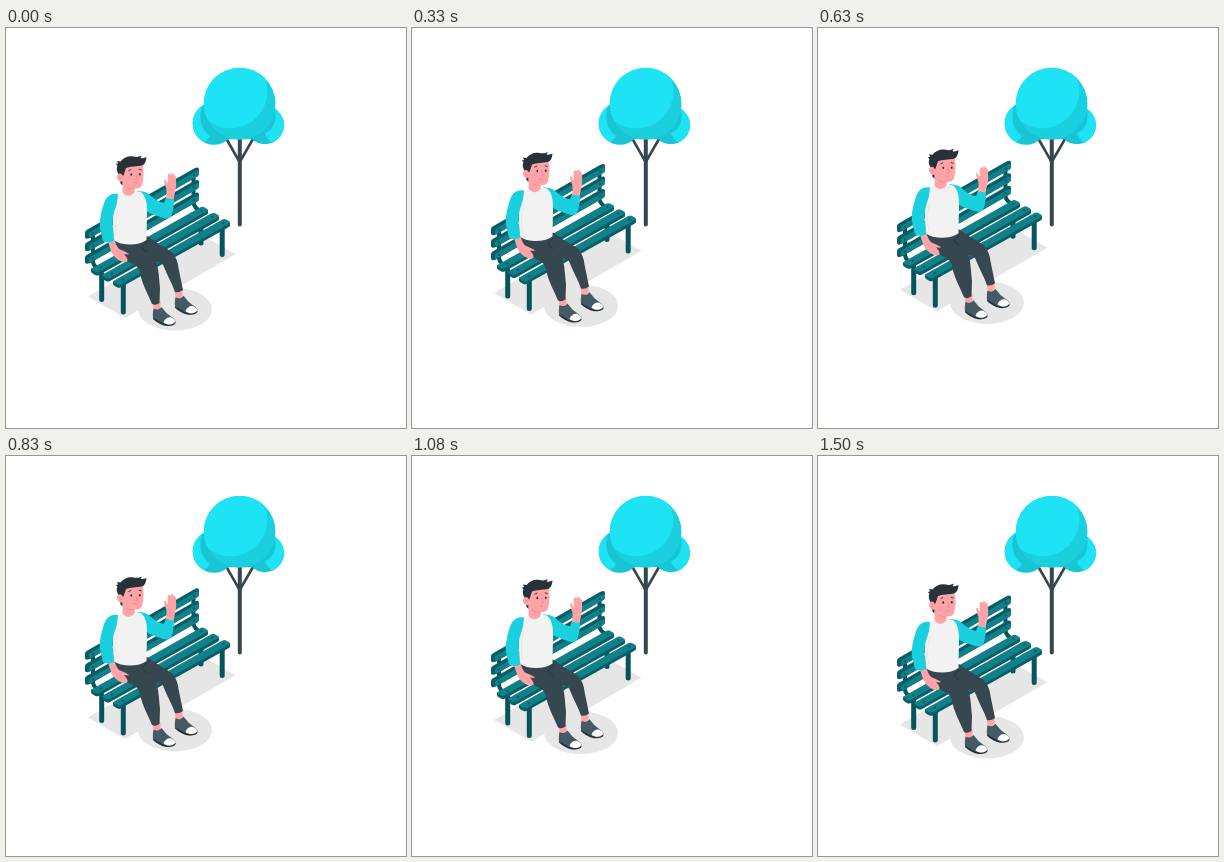
An HTML page for the animation above (1540 ms loop, 400 by 400 pixels).

```html
<!DOCTYPE html>
<html lang="en">
<head>
<meta charset="utf-8">
<title>Park bench</title>
<style>
  html, body { margin: 0; width: 100%; height: 100%; overflow: hidden; background: #fff; }
  svg { display: block; width: 100vw; height: 100vh; }
  .dark { fill: #075e66; }
  .teal { fill: #128089; }
  .hair { fill: #263238; }
  .cloth { fill: #37474f; }
  .skin { fill: #ffa3a6; }
  .cyan { fill: #1ad0df; }
  .deep { fill: #19c5d4; }
  .light { fill: #1de3f5; }
  .shade { fill: #e6e6e6; }
  .line { fill: none; stroke-linecap: round; stroke-linejoin: round; }
</style>
</head>
<body>
<svg viewBox="0 0 400 400">
  <defs>
    <clipPath id="crown"><circle cx="233.7" cy="75.8" r="36"/></clipPath>
    <clipPath id="bushes"><circle cx="208" cy="95.5" r="21.3"/><circle cx="258.8" cy="97" r="19.2"/></clipPath>
    <g id="backSlat">
      <path class="dark" d="M79 204.500q0-1.500 2-2.700L188 140.500q5-2.500 5 1v4q0 2-2 3L84 210q-5 2-5-1z"/>
      <path class="teal" d="M83 206q0-1.500 2-2.500L190 143.200q3-1.500 3 .500v2q0 2-2 3L86 208.700q-3 1.500-3-1z"/>
      <circle class="dark" cx="87" cy="205.500" r="1.200"/>
      <circle class="dark" cx="188" cy="147" r="1.300"/>
    </g>
    <g id="seatSlat">
      <path class="dark" d="M107 253.500L219 192l5 3v2.500q0 1-2 2L115 259.300q-2 1-4 0l-3-1.800q-1-1-1-2z"/>
      <path class="teal" d="M108 252.700L216 191.800q2.500-1.200 4-.300l3.200 1.800q1.600 1.200-.700 2.600L115 256.200q-2 1-4 0l-3-1.700q-1.400-1 0-1.800z"/>
      <circle class="dark" cx="117" cy="251.800" r="1.200"/>
      <circle class="dark" cx="217.300" cy="195" r="1.200"/>
    </g>
    <g id="shoe">
      <path class="hair" d="M147 287v4c3 3 8 6 13 7 5 .500 10-1 9.500-4z"/>
      <path fill="#455a64" d="M147.500 280.500c3 2 6 1 8-1.500l5 6c3 3 8 5 9 8-1 4-7 5-11 3-4-1.500-8-5-11.500-6-.500-4 0-7 .500-9.500z"/>
      <path fill="#fff" d="M157.500 294.500c1-4 5-6 8-5 3 1.500 4 3 3.500 4.500-2 3-7 3.500-11.500.500z"/>
    </g>
  </defs>

  <!-- tree -->
  <g class="line" stroke="#37474f">
    <path stroke-width="4" d="M233.800 108V196.500"/>
    <path stroke-width="2.600" d="M220.500 111l12.800 22.500M247 111L234.300 133"/>
  </g>
  <path class="deep" d="M208 85h51v24q-25 5-50 0z"/>
  <g clip-path="url(#bushes)">
    <rect class="deep" x="186" y="70" width="94" height="50"/>
    <path class="light" d="M186 70h14c-9 15-7 30 4 38-2 4-6 5-8 9h-10z"/>
    <path class="light" d="M268 76c4 15 0 26-9 29 1 5 5 7 8 11h13V76z"/>
  </g>
  <g clip-path="url(#crown)">
    <circle class="cyan" cx="233.700" cy="75.800" r="36"/>
    <circle class="light" cx="224.500" cy="63.500" r="36.800"/>
  </g>

  <g id="scene">
    <path class="shade" d="M82 268.500L192 205l37.500 21.300L119 290z"/>
    <ellipse class="shade" cx="169" cy="281.300" rx="37" ry="21.300"/>

    <!-- bench -->
    <g class="line" stroke="#06545c">
      <path stroke-width="5" d="M95.700 246v25.500M195 196v19"/>
      <path stroke-width="4" d="M87 206v28q1 5 7 8M187.500 147v28q1 5 7 8"/>
    </g>
    <use href="#backSlat" y="25"/>
    <use href="#backSlat" y="12.500"/>
    <use href="#backSlat"/>
    <path class="line" stroke="#06545c" stroke-width="5" d="M117.300 256v28M216.200 198v28.500"/>
    <use href="#seatSlat" x="-22" y="-12.400"/>
    <use href="#seatSlat" x="-11" y="-6.200"/>
    <use href="#seatSlat"/>

    <!-- legs -->
    <path class="skin" d="M146.500 273h8v7q-4 4-7 1zM168.500 262h8v6q-4 4-7 1z"/>
    <use href="#shoe"/>
    <use href="#shoe" x="22" y="-11.300"/>
    <path class="cloth" d="M124 214L141 208c8 6 17 11 25 16 4 5 6 10 6.500 16l4.500 22q-4 3-8 2c-3-9-8-17-11-25-1-4-4-5-8-5l-16-7z"/>
    <path class="cloth" d="M109 210c10 5 21 5 32-1l-5 11c7 5 13 9 15 16 2 8 2 16 3 24l-.500 15q-4 3-7.500 1c-4-10-10-20-12-31-1-5-3-7-7-9-8-3-16-11-18-26z"/>
    <path class="line" stroke="#263238" stroke-width=".8" d="M142 213q-4 3-6 7l5 4"/>

    <!-- arms and torso -->
    <path class="skin" d="M159 175c1-5 2-9 1.500-14-1.500-4-3-8-2-9.500 1.500 0 2 3 3.500 4 0-4-1-8 .500-9.500 1-.500 1.500 0 2 1 .500-2 2-2.500 3-.500 2 .500 2.500 2 2.500 4 .500 5 0 10-1 14l-2 10z"/>
    <path class="cyan" d="M131 163c8 0 11 2 15 6 4 3 7 5 12 6l2-5 8 1.500c0 7-1 12-3 17-2 3-6 2-9 1-8-2-14-5-20-9z"/>
    <path fill="#f2f2f2" d="M110 167c8-4 17-5 25-3 5 4 6 11 6 20l-.500 28c-8 6-25 6-33 0l-1-28z"/>
    <path class="line" stroke="#e2e2e2" stroke-width=".8" d="M112 181q-5 15-1 27"/>
    <path class="skin" d="M101 211l7-1c1 4 2 8 5 11 4 2 8 3 10 5-1 1-3 0-5 0 2 2 4 5 3.500 7-2 2-6 1-9-1-4-3-7-6-8-11z"/>
    <path class="cyan" d="M112 166c-7-1-11 2-13.500 8-3 9-5.500 18-4.500 26l3 13q6 3 11 0c0-5-1.500-12-1.500-18 0-8 3-14 4.500-20z"/>

    <!-- head -->
    <path class="skin" d="M117 151l12 5-.500 8c-3 5-9 5-12 0z"/>
    <path fill="#f28f91" d="M119 158l9 1.500v1.500q-6 1-9-3z"/>
    <path class="skin" d="M117 137c6-5 15-5 19-2 2 6 2 14 .500 20-1 5-4 6-8 5.500-7 0-11-3-12-8z"/>
    <path class="hair" d="M113 147c-2-3-3-7-1.500-9l-1.500-2 2-.500-1-2.500 3.500.500c3-4 8-6 13-5 4 1 6 0 8-1 0 2-1 2-1 2.500 2 .500 4 0 6-1-.500 5-2 7.500-4.500 8.500-5 1-12 1-16 2.500l-2 6-1.500 3.500v8l-2-2z"/>
    <path class="skin" d="M117 148c-2-4-6-3-6 1 0 3 3 6 6 4z"/>
    <path fill="#f28f91" d="M113 149q2-1 3 2-2 1-3-2z"/>
    <ellipse class="hair" cx="125.300" cy="146.500" rx=".9" ry="1.200"/>
    <ellipse class="hair" cx="133.800" cy="146.300" rx=".9" ry="1.200"/>
    <path class="line" stroke="#263238" stroke-width=".9" d="M122.800 142.600l2-1M133.200 141.300l2 .6"/>
    <path class="line" stroke="#f07f84" stroke-width=".8" d="M130 147l1.200 4-1.500.500M127.500 154.500q1.500 1 3 .300"/>
  </g>
</svg>
<script>
  const LOOP = 1540, FLOAT = 1500, RISE = 8, FPS = 24;
  const scene = document.getElementById('scene');
  const start = performance.now();

  function draw(now) {
    const time = Math.max(0, now - start) % LOOP;
    const step = Math.floor((time + 5) * FPS / 1000) * 1000 / FPS;
    const phase = Math.min(step / FLOAT, 1);
    const lift = RISE * (1 - Math.abs(1 - 2 * phase));
    scene.setAttribute('transform', `translate(0 ${-lift})`);
    requestAnimationFrame(draw);
  }
  draw(start);
</script>
</body>
</html>
```
